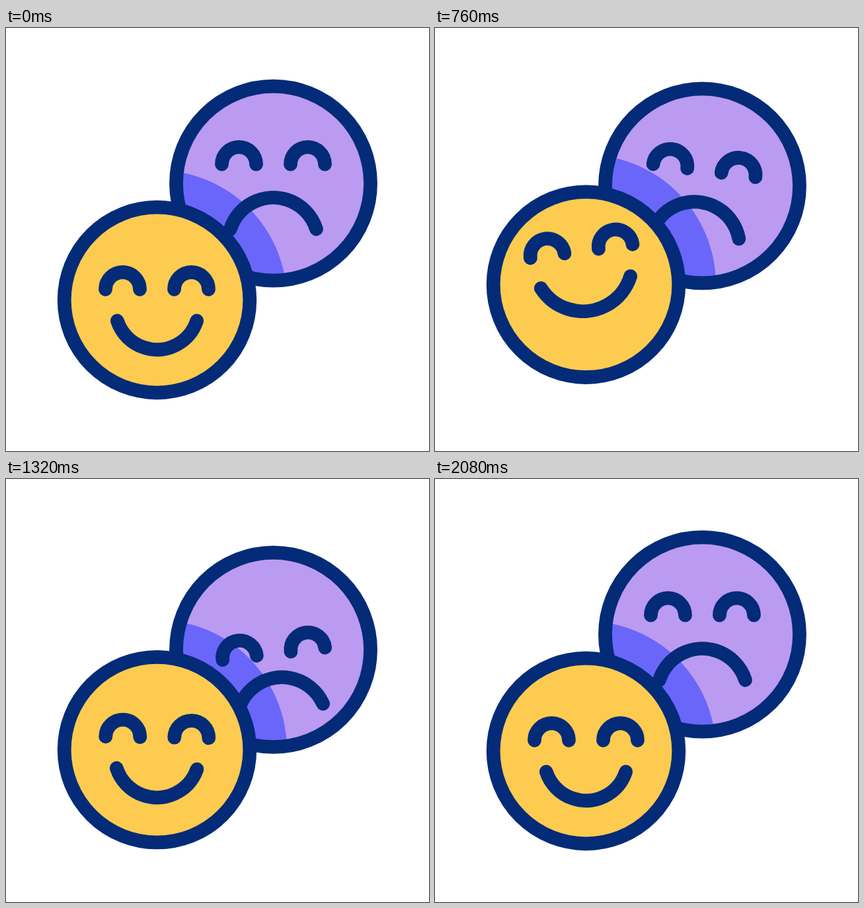
Write an HTML page with a canvas that moves like this. It is 640 px wide and 640 px high and loops after 2.12 s.

```html
<!DOCTYPE html>
<html lang="en">
<head>
<meta charset="utf-8">
<title>Mood faces</title>
<style>
  html, body { margin: 0; width: 100%; height: 100%; overflow: hidden; background: #fff; }
  canvas { display: block; width: 100vmin; height: 100vmin; }
</style>
</head>
<body>
<canvas id="stage" width="640" height="640"></canvas>
<script>
const ctx = document.getElementById('stage').getContext('2d');
const LOOP = 2120, STEP = 40, DELAY = 530, LINE = 20.8;
const NAVY = '#032b78', YELLOW = '#fdcb50', LILAC = '#bb9af2', SHADE = '#6a66fa';

// Keyframes as [time, value]
const LIFT = [[60, 0], [760, 1], [1520, 0]];
const TILT = [[60, 0], [420, 12.3], [720, -8], [1060, 3], [1520, 0]];

// cubic-bezier(.4, 0, .4, 1)
function ease(x) {
  let lo = 0, hi = 1;
  for (let i = 0; i < 24; i++) {
    const s = (lo + hi) / 2, q = 1 - s;
    const bx = 1.2 * q * q * s + 1.2 * q * s * s + s * s * s;
    if (bx < x) lo = s; else hi = s;
  }
  return lo * lo * (3 - 2 * lo);
}

function track(keys, t) {
  if (t <= keys[0][0]) return keys[0][1];
  for (let i = 1; i < keys.length; i++) {
    const [t0, a] = keys[i - 1], [t1, b] = keys[i];
    if (t < t1) return a + (b - a) * ease((t - t0) / (t1 - t0));
  }
  return keys[keys.length - 1][1];
}

function disc(x, y, r, fill) {
  ctx.beginPath();
  ctx.arc(x, y, r, 0, 2 * Math.PI);
  ctx.fillStyle = fill;
  ctx.fill();
}

function strokeArc(x, y, r, from, to) {
  ctx.beginPath();
  ctx.arc(x, y, r, from, to);
  ctx.stroke();
}

// dir 1 is a smile with its lowest point at y, dir -1 a frown with its top at y
function mouth(y, half, depth, dir) {
  const r = (half * half + depth * depth) / (2 * depth);
  const a = Math.asin(half / r), mid = dir * Math.PI / 2;
  strokeArc(0, y - dir * r, r, mid - a, mid + a);
}

function features(x, y, tilt, eyeY, drawMouth) {
  ctx.save();
  ctx.translate(x, y);
  ctx.rotate(tilt * Math.PI / 180);
  for (const side of [-1, 1]) strokeArc(52 * side, eyeY, 26, Math.PI, 2 * Math.PI);
  drawMouth();
  ctx.restore();
}

function ring(x, y, r) {
  strokeArc(x, y, r, 0, 2 * Math.PI);
}

function draw(t) {
  const up = track(LIFT, t), down = track(LIFT, t - DELAY);
  const hx = 228.5, hy = 411.5 - 23.3 * up;
  const sx = 404.5, sy = 235.2 + 23.3 * down;

  ctx.fillStyle = '#fff';
  ctx.fillRect(0, 0, 640, 640);
  ctx.strokeStyle = NAVY;
  ctx.lineWidth = LINE;
  ctx.lineCap = 'round';

  // Sad face, with the shade cast by the happy one
  disc(sx, sy, 147, LILAC);
  ctx.save();
  ctx.clip();
  disc(hx, hy, 196.5, SHADE);
  ctx.restore();
  ring(sx, sy, 147);
  features(sx, sy, track(TILT, t - DELAY), -29 + 35 * down,
    () => mouth(21.4 + 21 * down, 65, 47.6, -1));

  // Happy face
  disc(hx, hy, 140.3, YELLOW);
  ring(hx, hy, 140.3);
  features(hx, hy, track(TILT, t), -16 - 35 * up,
    () => mouth(75.1 - 35 * up, 60.2 + 8.1 * up, 43.7, 1));
}

const start = performance.now();
function tick() {
  const t = (performance.now() - start) % LOOP;
  draw(Math.floor(t / STEP) * STEP);
  requestAnimationFrame(tick);
}
tick();
</script>
</body>
</html>
```
